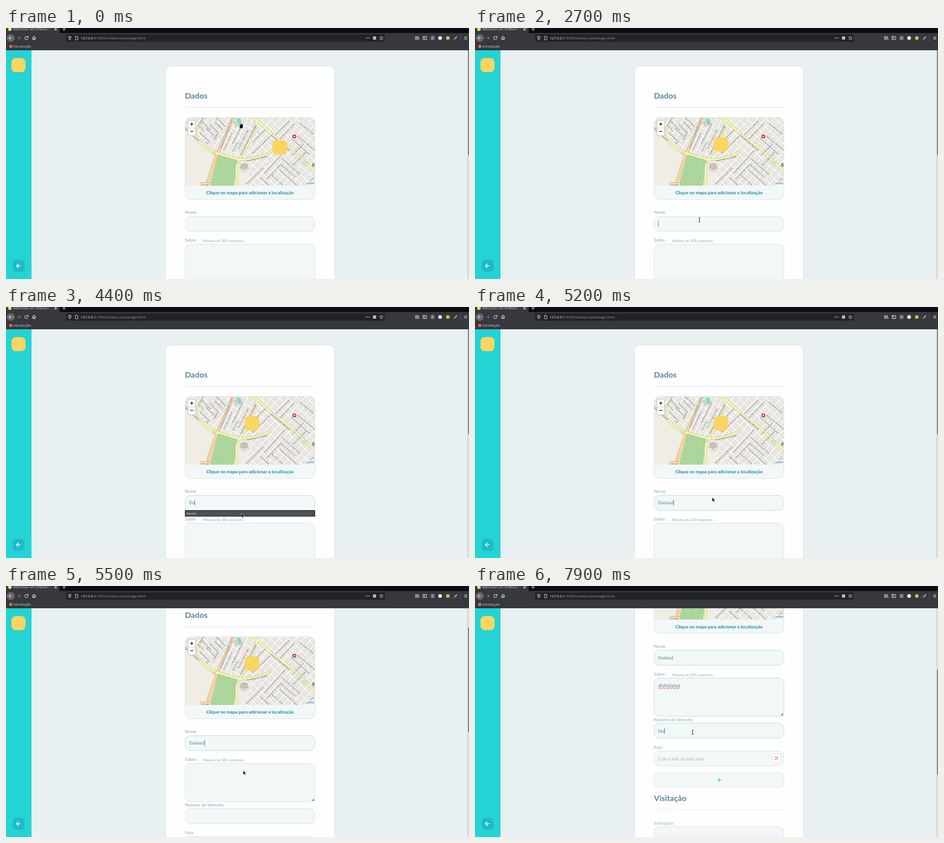
Write an HTML page that moves like this. It is 1017x551 px and loops after 8000 ms.

```html
<!DOCTYPE html>
<html lang="pt-BR">
<head>
<meta charset="utf-8">
<title>Adicionar um orfanato</title>
<style>
html, body { margin: 0; width: 100%; height: 100%; overflow: hidden; }
body { position: relative; background: #e8f0f2; font-family: Lato, "Open Sans", sans-serif; color: #8fa7b2; }
body *, body { box-sizing: border-box; }
#view, #page, #chrome, #side, #map, #cursor, #cursor svg, .t, .box, .hr, .pin { position: absolute; }
#view { left: 0; top: 48px; width: 1017px; height: 503px; overflow: hidden; }
#page { left: 0; top: -48px; width: 1017px; height: 1000px; animation: scroll 8s step-end infinite; }
#chrome { left: 0; top: 0; }
.t { white-space: nowrap; line-height: 20px; margin-top: -10px; font-size: 9.5px; left: 393px; }
.h { font-size: 17.5px; font-weight: 700; color: #5c8596; }
.hr { left: 393px; width: 286px; height: 1px; background: #d9e4e7; }
.box { left: 392.5px; width: 286.5px; height: 34px; background: #f2f7f7; border: 1px solid #d5e4e7; border-radius: 12px; }
.field { padding-left: 8.5px; display: flex; align-items: center; font-size: 10px; line-height: 13px; color: #5c8596; }
.field.filled { border-color: #a9e6c9; }
.field i { width: 1px; height: 13px; background: #48707f; visibility: hidden; }
.field.focus i { visibility: visible; }
.field.spell span { text-decoration: underline wavy #d8333a 0.7px; text-underline-offset: 1px; }
#about { height: 85px; align-items: flex-start; padding-top: 9px; }
#about svg { position: absolute; right: 1px; bottom: 1px; }
.card { left: 350px; top: 82.5px; width: 371.5px; height: 960px; background: #fefefe; border-radius: 13px; }
.frame { top: 196px; height: 181px; overflow: hidden; }
#map { left: 0; top: 0; }
.pin { left: 0; top: 0; width: 32px; height: 32px; border-radius: 9px; background: #fad561; animation: pin 8s step-end infinite; }
.zoom { left: 398.5px; top: 201.5px; width: 18.5px; height: 35px; border: 1.5px solid #b9b6ad; border-radius: 3.5px; background: linear-gradient(#fff 48%, #ccc 48%, #ccc 51%, #fff 51%); }
.zoom svg { display: block; }
#popup { top: 446px; height: 14px; border-radius: 0; border: 1px solid #121217; background: #4e4f59; color: #c3c4c9; font: 8px/11px "Open Sans", sans-serif; padding-left: 2.5px; animation: popup 8s step-end infinite; }
#side { left: 0; top: 48px; width: 56px; height: 503px; background: #24d3d3; }
#track { position: absolute; right: 0; top: 48px; width: 4px; height: 503px; background: #d7dbdc; }
#track b { position: absolute; left: 1.5px; top: 1px; width: 2.5px; height: 230px; background: #73777a; animation: thumb 8s step-end infinite; }
#cursor { left: 0; top: 0; animation: move 8s step-end infinite; }
#cursor svg { left: -12px; top: -12px; animation: 8s step-end infinite; }
#hand { animation-name: hand !important; }
#arrow { animation-name: arrow !important; }
#beam { animation-name: beam !important; }

@keyframes scroll {
  0% { transform: none; }
  67.5% { transform: translateY(-10px); }
  68.75% { transform: translateY(-85px); }
  70% { transform: translateY(-190px); }
  71.25%, 100% { transform: translateY(-272.5px); }
}
@keyframes thumb {
  0% { transform: none; }
  67.5% { transform: translateY(5px); }
  68.75% { transform: translateY(42px); }
  70% { transform: translateY(94px); }
  71.25%, 100% { transform: translateY(135px); }
}
@keyframes pin {
  0% { transform: translate(585px, 246px); }
  10% { transform: translate(495px, 203px); }
  16.25%, 100% { transform: translate(524.5px, 239.5px); }
}
@keyframes popup { 0%, 56.25%, 100% { visibility: hidden; } 48.75% { visibility: visible; } }
@keyframes hand { 0% { opacity: 1; } 27.5%, 100% { opacity: 0; } }
@keyframes arrow { 0%, 30%, 75%, 100% { opacity: 0; } 27.5%, 48.75% { opacity: 1; } }
@keyframes beam { 0%, 48.75% { opacity: 0; } 30%, 75%, 100% { opacity: 1; } }
@keyframes move {
  0% { transform: translate(517px, 215px); }
  1.25% { transform: translate(518px, 226px); }
  2.5% { transform: translate(518px, 243px); }
  5% { transform: translate(519px, 241px); }
  7.5% { transform: translate(519px, 242px); }
  13.75% { transform: translate(530px, 254px); }
  15% { transform: translate(544px, 271px); }
  16.25% { transform: translate(546px, 275px); }
  18.75% { transform: translate(577px, 246px); }
  23.75% { transform: translate(575px, 256px); }
  25% { transform: translate(569px, 278px); }
  26.25% { transform: translate(558px, 312px); }
  27.5% { transform: translate(543px, 352px); }
  28.75% { transform: translate(524px, 392px); }
  30% { transform: translate(506px, 428px); }
  31.25% { transform: translate(496px, 445px); }
  32.5% { transform: translate(493px, 432px); }
  33.75% { transform: translate(493px, 421px); }
  43.75% { transform: translate(580px, 444px); }
  48.75% { transform: translate(566px, 449px); }
  50% { transform: translate(545px, 453px); }
  51.25% { transform: translate(526px, 454px); }
  52.5% { transform: translate(517px, 453px); }
  63.75% { transform: translate(518px, 438px); }
  65% { transform: translate(521px, 418px); }
  66.25% { transform: translate(521px, 405px); }
  73.75% { transform: translate(517px, 392px); }
  75% { transform: translate(503px, 352px); }
  76.25% { transform: translate(485px, 295px); }
  77.5% { transform: translate(469px, 248px); }
  78.75% { transform: translate(463px, 231px); }
  86.25% { transform: translate(470px, 247px); }
  87.5% { transform: translate(475px, 267px); }
  90% { transform: translate(476px, 298px); }
  92.5% { transform: translate(478px, 311px); }
  93.75% { transform: translate(478px, 318px); }
  95%, 100% { transform: translate(478px, 321px); }
}
</style>
</head>
<body>
<div id="view"><div id="page">
  <div class="box card"></div>
  <div class="t h" style="top:149px">Dados</div>
  <div class="hr" style="top:174px"></div>
  <div class="box frame">
    <svg id="map" width="285" height="148.5" viewBox="393.5 197 285 148.5">
      <defs>
        <g id="cell"><rect width="16" height="16" fill="#e9e6df"/><path d="M0 4H16M4 0V16" stroke="#cdc8bf" stroke-width="3"/><path d="M0 4H16M4 0V16" stroke="#fff" stroke-width="2.1"/></g>
        <pattern id="west" width="12" height="16" patternUnits="userSpaceOnUse" patternTransform="rotate(38)"><use href="#cell"/></pattern>
        <pattern id="mid" width="11" height="16" patternUnits="userSpaceOnUse" patternTransform="rotate(25)"><use href="#cell"/></pattern>
        <pattern id="east" width="13" height="14" patternUnits="userSpaceOnUse" patternTransform="rotate(43)"><use href="#cell"/></pattern>
        <pattern id="trees" width="15" height="14" patternUnits="userSpaceOnUse" patternTransform="rotate(15)"><rect width="15" height="14" fill="#add69c"/><circle cx="6" cy="6" r="1.4" fill="#97c587"/></pattern>
      </defs>
      <rect x="393" y="196" width="287" height="151" fill="#efede4"/>
      <path d="M393 196H498L465 276L393 219Z" fill="url(#west)"/>
      <path d="M498 196H552L511 290L464 276Z" fill="url(#mid)"/>
      <path d="M552 196H680V347H525L540 300L512 289Z" fill="url(#east)"/>
      <path d="M466 279L507 291L500 346H447Z" fill="url(#trees)" stroke="#94c486" stroke-width=".6"/>
      <g fill="none" stroke-linejoin="round" stroke-linecap="round">
        <g id="roads"></g>
      </g>
      <circle cx="456" cy="276" r="2.8" fill="#cfe3b4" stroke="#b2b77c" stroke-width=".7"/>
      <path d="M499 205l8-3 4 12-8 3z" fill="#d5cec6"/>
      <path d="M503 197l12-2 5 18-11 3z" fill="#bfe9d2"/><path d="M506 200l8-1 3 12-7 2z" fill="#8ed6b6"/>
      <g fill="#bdf0c5"><circle cx="655" cy="297" r="4.6" stroke="#9ad39f" stroke-width=".6"/><circle cx="510" cy="253" r="3.2"/><circle cx="556" cy="232" r="3.2"/><circle cx="462" cy="200" r="3.2"/><circle cx="510" cy="295" r="3"/></g>
      <circle cx="523" cy="307" r="10" fill="#e7e1da" stroke="#c8beb2" stroke-width=".6"/>
      <path d="M516 298l4 1 3-3 3 3 4 0-1 5 2 4-5 1-4 3-3-4-5 0 2-5z" fill="#cdbfb4" stroke="#aa9c90" stroke-width=".6"/>
      <path d="M440 249l5 4-3 3-4-4z" fill="#ccc3bb"/>
      <circle cx="633" cy="238" r="4.2" fill="#bd1730"/><path d="M630.5 238h5M633 235.500v5" stroke="#fff" stroke-width="1.4"/>
      <rect x="427" y="339.500" width="24" height="8" rx="1" fill="#f8dfb7" stroke="#bd8b4b" stroke-width=".7"/>
      <g id="names" font-family="'Noto Sans', sans-serif" text-anchor="middle" fill="#383838" stroke="#fff" stroke-width="1.1" stroke-opacity=".8" paint-order="stroke" stroke-linejoin="round"></g>
      <text x="672" y="303.500" font-family="'Noto Sans', sans-serif" font-size="8.500" fill="#222">B</text>
      <rect x="656" y="336" width="23" height="10" fill="#fff" opacity=".7"/>
      <text x="657.500" y="342.500" font-family="'Liberation Sans', sans-serif" font-size="6.300" fill="#1680ab">Leaflet</text>
    </svg>
  </div>
  <div class="pin"></div>
  <div class="box zoom"><svg width="15.5" height="32" viewBox="0 0 15.5 32"><path d="M4.800 8h6.400M8 4.800v6.400M4.800 24h6.400" stroke="#111" stroke-width="1.500"/></svg></div>
  <div class="t" style="top:361px;width:286px;text-align:center;font-size:10px;font-weight:700;color:#168b9c">Clique no mapa para adicionar a localização</div>

  <div class="t" style="top:405px">Nome</div>
  <div class="box field" id="name" style="top:412.5px"><span></span><i></i></div>
  <div class="t" style="top:466px">Sobre</div>
  <div class="t" style="top:467px;left:433px;font-size:7.7px">Máximo de 300 catacteres</div>
  <div class="box field" id="about" style="top:473.5px"><span></span><i></i><svg width="6" height="6"><path d="M6 0V6H0Z" fill="#87918f"/></svg></div>
  <div class="t" style="top:565.5px">Número de Velmotix</div>
  <div class="box field" id="phone" style="top:573px"><span></span><i></i></div>
  <div class="t" style="top:626.5px">Foto</div>
  <div class="box field" style="top:634px;color:#a3b8c0">Cole o link da foto aqui</div>
  <div class="box" style="left:652px;top:640px;width:20px;height:21px;border-radius:5px;background:#fff"><svg width="18" height="19" style="display:block"><path d="M5.500 6l7 7m0-7l-7 7" stroke="#ed6486" stroke-width="1.400" stroke-linecap="round"/></svg></div>
  <div class="box" style="top:680.5px;border:1px dashed #a9e3d2"><svg width="285" height="32" style="display:block"><path d="M138 16h9M142.500 11.500v9" stroke="#24c5cf" stroke-width="1.400"/></svg></div>
  <div class="t h" style="top:738px">Visitação</div>
  <div class="hr" style="top:763px"></div>
  <div class="t" style="top:792.5px">Instruções</div>
  <div class="box" style="top:799.5px;height:85px"></div>
  <div class="box" id="popup">dwdw</div>
</div></div>

<div id="side"><svg width="56" height="503" viewBox="0 48 56 503">
  <rect x="12" y="66" width="31" height="31" rx="9" fill="#fad561"/>
  <rect x="15" y="509" width="26" height="26" rx="8" fill="#1dbbc6"/>
  <path d="M32 522H23.500M27.500 517.500L23 522l4.500 4.500" fill="none" stroke="#fff" stroke-width="1.700"/>
</svg></div>
<div id="track"><b></b></div>

<svg id="chrome" width="1017" height="49" font-family="'Open Sans', sans-serif" fill="#d4d4d8">
  <defs><linearGradient id="fade"><stop offset=".8" stop-color="#d4d4d8"/><stop offset="1" stop-color="#d4d4d8" stop-opacity=".2"/></linearGradient></defs>
  <rect width="1017" height="48.500" fill="#37383d"/>
  <rect x="118" width="899" height="11" fill="#0c0d12"/>
  <rect y="47.500" width="1017" height="1" fill="#202126"/>
  <circle cx="8.500" cy="2.500" r="4" fill="#fad561"/>
  <text x="16" y="5.300" font-size="7.500" fill="url(#fade)">Adicionar um orfanato |</text>
  <rect x="132" y="14" width="700" height="16" rx="2" fill="#222328"/>
  <text x="164" y="24.800" font-size="8" fill="#96979e"><tspan fill="#f2f2f5">127.0.0.1</tspan>:5500/create-orphanage.html</text>
  <circle cx="10.500" cy="40.500" r="3.500" fill="#e8683a"/>
  <text x="16" y="43.300" font-size="7.600">Introdução</text>
  <circle cx="10.500" cy="22" r="8" fill="#63646a" stroke="#7d7e84" stroke-width=".8"/>
  <g fill="none" stroke="#d4d4d8" stroke-width="1.200">
    <path d="M106.500 .5l5 5m0-5l-5 5M123.500 2.500h8M127.500-1.500v8M14.500 22H7M10 18.500L6.500 22l3.500 3.500"/>
    <path d="M24 22h7.500M28 18.500l3.500 3.500-3.500 3.500" stroke="#77787e"/>
    <path d="M47.500 20a3.500 3.500 0 1 0 .5 3M48.500 17.500v3.200h-3.200M57.500 22l4-3.800 4 3.800M58.800 21.500v4h1.700v-2.500h2v2.500h1.700v-4"/>
    <path d="M140 18l3 1c0 4-1 6-3 7c-2-1-3-3-3-7zM140 18v8" stroke-width="1"/>
    <path d="M152.500 18h3.500l2 2v6h-5.500zM156 18v2h2" stroke-width="1"/>
    <path d="M824.500 17.800l1.200 2.800 3 .2-2.300 2 .8 3-2.700-1.700-2.700 1.700 .8-3-2.300-2 3-.2z" stroke-width=".9"/>
    <path d="M899.500 18v8M901.800 18v8M904 18v8M905.500 18.500l2 7.500"/>
    <path d="M916 18.500h8v7h-8zM919.500 18.500v7M916.500 20.500h3"/>
    <circle cx="937" cy="22" r="3.900" stroke-width=".9"/><path d="M934.500 25c.5-2.500 4.500-2.500 5 0" stroke-width="1"/><circle cx="937" cy="21" r="1" />
    <path d="M984 25.500l3.500-3.500M987 20l2.500 2.500M988 21.500l2.500-3" stroke-width="1.400"/>
    <path d="M997.500 14v16" stroke="#5a5b61" stroke-width=".8"/>
    <path d="M1006.500 19.500h6.500M1006.500 22h6.500M1006.500 24.500h6.500" stroke-width="1"/>
  </g>
  <circle cx="791" cy="22" r="1"/><circle cx="794.300" cy="22" r="1"/><circle cx="797.600" cy="22" r="1"/>
  <rect x="806" y="18.500" width="7" height="7" fill="#b9bac0"/>
  <circle cx="953.500" cy="22" r="4" fill="#f4f4f6"/>
  <circle cx="970.500" cy="22" r="4" fill="#dfb64b"/>
</svg>

<div id="cursor">
  <svg id="hand" width="24" height="24" viewBox="-12 -12 24 24"><path d="M-2.300 5.500L-4.500 1.500Q-5-.5-3.300 0L-3.200-3Q-2.500-4.600-1.500-3.300Q-.8-5.500 .5-3.800Q1.700-5 2.300-3.200Q3.700-3.800 3.700-2L3.500 2.500L2.500 5.500Z" fill="#0b0b0b" stroke="#f5f5f5" stroke-width=".5"/></svg>
  <svg id="arrow" width="24" height="24" viewBox="-12 -12 24 24"><path d="M0 0V9.300L2.200 7.300L3.600 10.600L5 10L3.600 6.800H6.500Z" fill="#0b0b0b" stroke="#eee" stroke-width=".6"/></svg>
  <svg id="beam" width="24" height="24" viewBox="-12 -12 24 24"><path d="M-2-4.700Q0-4.700 0-3.500Q0-4.700 2-4.700M0-3.500V3.500M-2 4.700Q0 4.700 0 3.500Q0 4.700 2 4.700" fill="none" stroke="#222" stroke-width="1.100"/></svg>
</div>

<script>
const LOOP = 8000;
const $ = id => document.getElementById(id);

function add(parent, tag, attrs, text = '') {
  const node = document.createElementNS('http://www.w3.org/2000/svg', tag);
  for (const key in attrs) node.setAttribute(key, attrs[key]);
  node.textContent = text;
  parent.append(node);
}

// Main roads: path, width, casing, fill
const YELLOW = ['#b9bd76', '#f5f8b8'];
const ORANGE = ['#cd9a58', '#fad5a3'];
const roads = [
  ['M434 194Q424 212 415 238', 4, YELLOW],
  ['M502 190Q486 226 470 262T440 348', 6.5, ORANGE],
  ['M390 216L432 256Q446 272 470 277L511 289Q546 290 579 273', 5.5, YELLOW],
  ['M553 190Q554 208 531 254T507 300Q504 322 508 348', 5.5, YELLOW],
  ['M530 193L555 206L584 234L630 267Q650 292 682 316', 5.5, YELLOW]
];
for (const pass of [0, 1])
  for (const [d, width, tones] of roads)
    add($('roads'), 'path', { d, stroke: tones[pass], 'stroke-width': width - pass * 1.4 });

// Street names: centre, angle, text
const major = [
  [551, 287, -12, 'Avenida Ivo Tardel'],
  [602, 252, 41, 'Avenida Davi Montrel'],
  [532, 246, -63, 'Avenida Prefeito Nilo Brandel'],
  [484, 231, -69, 'Rodovia Comendador Telmo'],
  [408, 234, 42, 'Marginal Tavarel'],
  [430, 201, -60, 'Avenida'],
  [439, 345, 0, 'RT-482']
];
const minor = [
  [472, 207, 45, 'Rua Paraguai'], [467, 215, 45, 'Rua Bolívia'],
  [457, 221, 45, 'Rua Equador'], [451, 232, 45, 'Rua Venezuela'],
  [440, 215, 45, 'Rua Uruguai'], [461, 237, -60, 'Rua Brasil'],
  [437, 241, 45, 'Rua Argentina'], [428, 219, 45, 'Rua Peru'],
  [487, 249, -65, 'Rua Serra do Norte'], [508, 232, -63, 'Rua Mauro de Abrantel'],
  [503, 261, -63, 'Rua Colina'], [521, 244, -63, 'Rua Frei Valério Prado'],
  [555, 237, -45, 'Rua Otávio Telmar'], [561, 256, -43, 'Rua Tarcísio Gondrel Filho'],
  [607, 219, -44, 'Rua Quirino Bocarel'], [617, 227, -46, 'Rua Bernardo Constel'],
  [660, 221, 40, 'Rua Adelmo Pintel'], [661, 255, 40, 'Rua Doutor Brenildo Veral'],
  [646, 260, 42, 'Rua Coronel Jairo Mantel'], [641, 267, -45, 'Rua São Belmiro'],
  [644, 287, -46, 'Rua Campos Sardel'], [590, 294, -48, 'Rua Marechal Dorival da Fontel'],
  [626, 304, 42, 'Rua Valdir Junquel Frazel'], [588, 315, -46, 'Rua Duílio de Castrel'],
  [546, 325, -44, 'Rua Jonas Justo de Limel'], [620, 314, 42, 'Rua General Osmir'],
  [620, 329, 42, 'Rua Josué Frantel Pascol'], [568, 337, 42, 'Rua Frantel'],
  [596, 334, 42, 'Rua Prof. Valter'], [667, 337, -45, 'Rua Doutor']
];
const label = (size, weight) => ([x, y, angle, text]) => add($('names'), 'text', {
  transform: `translate(${x} ${y}) rotate(${angle})`, dy: '.32em', 'font-size': size, 'font-weight': weight
}, text);
minor.forEach(label(4.6, 400));
major.forEach(label(5.3, 500));

// Typed text: [time, value so far]
const fields = [
  { node: $('name'), focus: [2700, 5900],
    keys: [[3900, 'D'], [4400, 'Da'], [4600, 'Dad'], [4800, 'Dadaa'], [5100, 'Dadaad']] },
  { node: $('about'), focus: [6400, 7400], spell: 7400,
    keys: [[6500, 'df'], [6700, 'dfdfd'], [6900, 'dfdfdda'], [7000, 'dfdfddafa'], [7200, 'dfdfddafad']] },
  { node: $('phone'), focus: [7500, LOOP], keys: [[7800, 'f'], [7900, 'fda']] }
];

let start;
function tick(now) {
  start ??= now;
  const t = (now - start) % LOOP;
  for (const { node, focus, keys, spell = LOOP } of fields) {
    const text = keys.filter(([time]) => time <= t).pop()?.[1] ?? '';
    const span = node.firstElementChild;
    if (span.textContent !== text) span.textContent = text;
    node.classList.toggle('filled', text !== '');
    node.classList.toggle('focus', t >= focus[0] && t < focus[1]);
    node.classList.toggle('spell', t >= spell);
  }
  requestAnimationFrame(tick);
}
requestAnimationFrame(tick);
</script>
</body>
</html>
```
